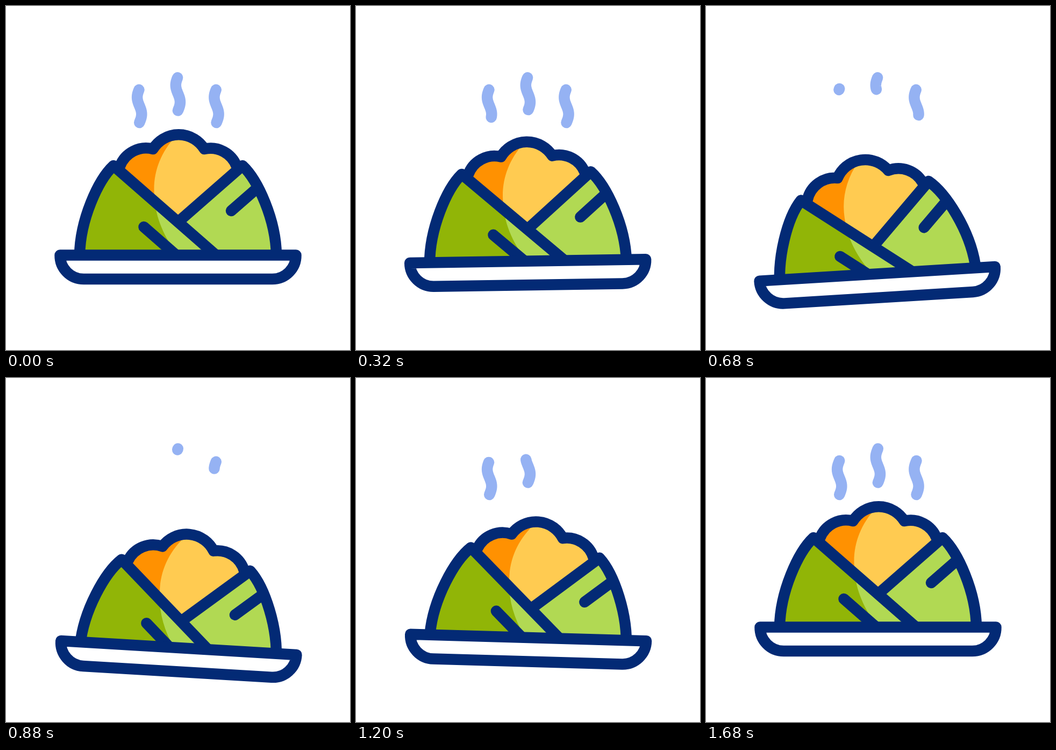
Recreate the animation shown at these times as an HTML page with a canvas. Size 640 px wide and 640 px high, loop 2.04 s.

```html
<!DOCTYPE html>
<html lang="en">
<head>
<meta charset="utf-8">
<title>Steaming rice dumpling</title>
<style>
  html, body { margin: 0; width: 100%; height: 100%; overflow: hidden; background: #fff; }
  canvas { display: block; width: 640px; height: 640px; }
</style>
</head>
<body>
<canvas id="stage" width="640" height="640"></canvas>
<script>
const ctx = document.getElementById('stage').getContext('2d');
const LOOP = 2040, STEP = 40;
const NAVY = '#032a75', STEAM = '#95b2f3';
const LEAF = '#b1d953', LEAF_DARK = '#91b507', RICE = '#ffcb51', RICE_DARK = '#ff9101';

const plate = new Path2D('M100.5 463.5H539.5A44 44 0 0 1 495.5 508H144.5A44 44 0 0 1 100.5 463.5Z');
const leaves = new Path2D('M137 470V463C138 398 171 324 200 297L320 402L440 297C469 324 502 398 503 463V470Z');
const rice = new Path2D('M212 298A52 52 0 0 1 273.5 266A56 56 0 0 1 369 266A52 52 0 0 1 429 298L320 402Z');
const shade = new Path2D('M316 242C289 271 275.5 305 275.5 341C275.5 382 287 416 312 453V480H120V240Z');
const riceLine = new Path2D('M212 298A52 52 0 0 1 273.5 266A56 56 0 0 1 369 266A52 52 0 0 1 429 298');
const leafLines = new Path2D(
  'M320 402L440 297C469 324 502 398 503 463V470' +
  'M137 470V463C138 398 171 324 200 297L390 463' +
  'M256.5 411L316 463M419 381L466 340');

// Keyframes are [time, value], joined by a cosine ease.
const plateDrop = [[20, 0], [850, 38.6], [1555, 0]];
const plateTilt = [[215, 0], [590, -4.8], [950, 4.2], [1385, 0]];
const domeDrop = [[35, 0], [860, 50.7], [1580, 0]];
const domeTilt = [[230, 0], [630, -9.4], [990, 9], [1418, 0]];

const clamp = u => Math.min(1, Math.max(0, u));

function valueAt(keys, t) {
  let value = keys[0][1];
  for (let i = 1; i < keys.length; i++) {
    const [t0, v0] = keys[i - 1], [t1, v1] = keys[i];
    if (t >= t0) value = v0 + (v1 - v0) * (1 - Math.cos(Math.PI * clamp((t - t0) / (t1 - t0)))) / 2;
  }
  return value;
}

function posed(pivotY, drop, tilt, paint) {
  ctx.save();
  ctx.translate(320, pivotY + drop);
  ctx.rotate(tilt * Math.PI / 180);
  ctx.translate(-320, -pivotY);
  paint();
  ctx.restore();
}

function fillShaded(path, light, dark) {
  ctx.save();
  ctx.fillStyle = light;
  ctx.fill(path);
  ctx.clip(path);
  ctx.fillStyle = dark;
  ctx.fill(shade);
  ctx.restore();
}

function paintDome() {
  fillShaded(leaves, LEAF, LEAF_DARK);
  fillShaded(rice, RICE, RICE_DARK);
  ctx.stroke(riceLine);
  ctx.stroke(leafLines);
}

function paintPlate() {
  ctx.fillStyle = '#fff';
  ctx.fill(plate);
  ctx.stroke(plate);
}

// Part of a wisp between two fractions of its height, top to bottom.
function strokeWisp(x, y, from, to) {
  const parts = 24;
  ctx.beginPath();
  for (let i = 0; i <= parts; i++) {
    const u = from + (to - from) * i / parts;
    ctx.lineTo(x - 4.1 * Math.sin(2 * Math.PI * u), y + 63 * u);
  }
  ctx.stroke();
}

// Each wisp shrinks upwards to a dot, then grows again from below.
function paintWisp(x, y, t) {
  if (t < 880) {
    strokeWisp(x, y, 0.03, 1 - clamp(t / 615) ** 2.8);
  } else {
    const top = (1 - clamp((t - 880) / 480)) ** 2.8;
    if (top < 1) strokeWisp(x, y, top, 1);
  }
}

function draw(t) {
  ctx.fillStyle = '#fff';
  ctx.fillRect(0, 0, 640, 640);
  ctx.lineCap = ctx.lineJoin = 'round';
  ctx.lineWidth = 20.5;

  ctx.strokeStyle = STEAM;
  paintWisp(248.2, 154, t);
  paintWisp(319.9, 131.5, t - 160);
  paintWisp(391.5, 154, t - 320);

  ctx.strokeStyle = NAVY;
  posed(463.5, valueAt(domeDrop, t), valueAt(domeTilt, t), paintDome);
  posed(486, valueAt(plateDrop, t), valueAt(plateTilt, t), paintPlate);
}

const start = performance.now();
function tick() {
  const t = (performance.now() - start) % LOOP;
  draw(Math.floor((t + 4) / STEP) * STEP % LOOP);
  requestAnimationFrame(tick);
}
tick();
</script>
</body>
</html>
```
